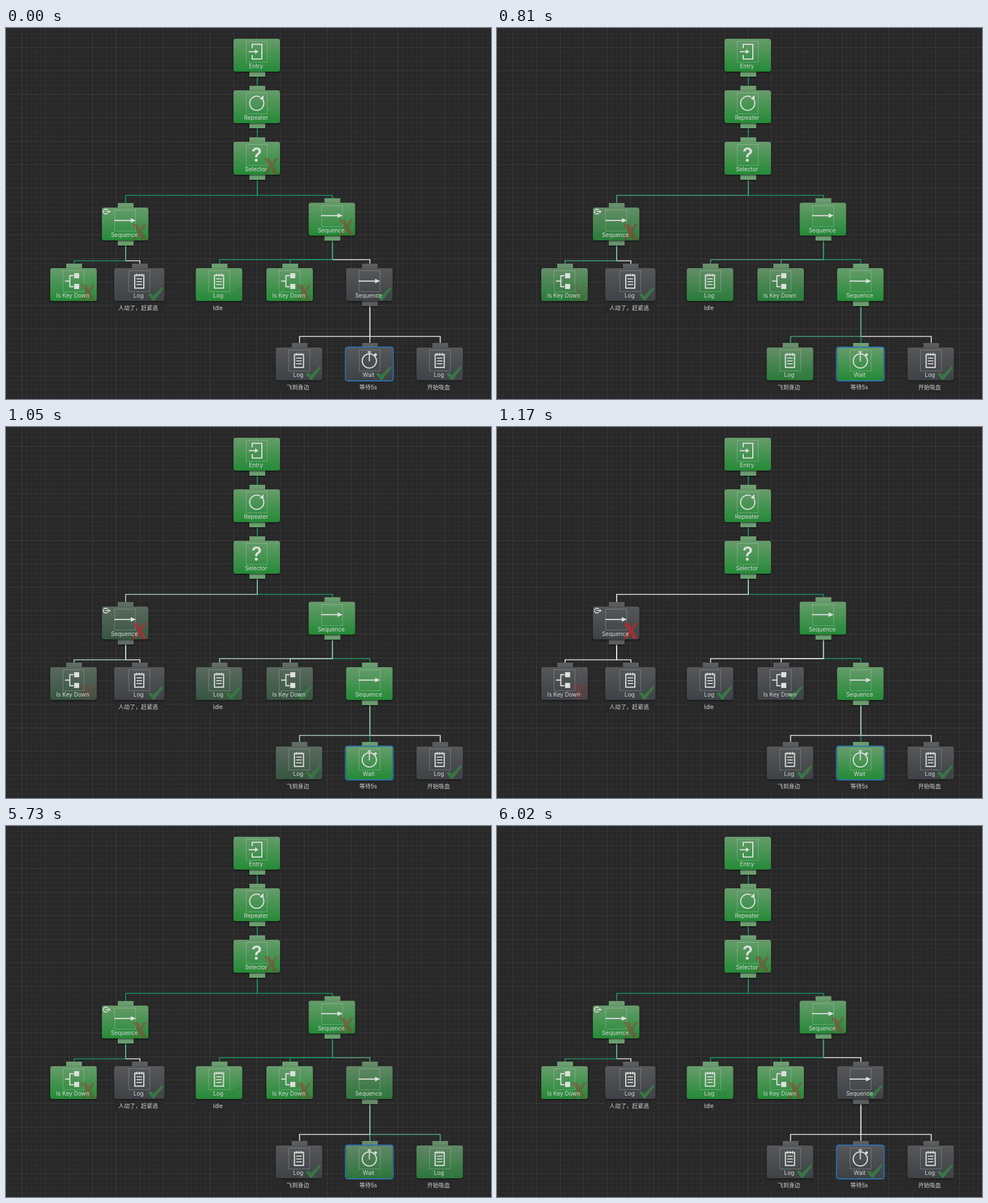
These frames come from a looping animation (855x655 px, 6.59 s). An HTML page with a canvas:

```html
<!DOCTYPE html>
<html lang="en">
<head>
<meta charset="utf-8">
<title>Behavior tree</title>
<style>
html, body { margin: 0; height: 100%; overflow: hidden; background: #282828; }
canvas { display: block; }
</style>
</head>
<body>
<canvas id="stage" width="855" height="655"></canvas>
<script>
const c = document.getElementById('stage').getContext('2d');
const LOOP = 6590, WAITING = 720, RESTART = 5610;
const INK = '#dde0dd';
const FONT = 'Inter, "Noto Sans CJK SC", "Noto Sans CJK", sans-serif';

// run / rerun: 2 = stays active, 1 = active then fades, 0 = idle
const node = (x, y, label, icon, parent, run, rerun, mark = '', remark = '', extra = {}) =>
  ({ x, y, w: 82, label, icon, parent, run, rerun, mark, remark, ...extra });

const entry = node(442, 19, 'Entry', 'door', null, 2, 2);
const repeater = node(442, 110, 'Repeater', 'loop', entry, 2, 2);
const selector = node(442, 201, 'Selector', 'question', repeater, 2, 2, '', 'cross', { bar: 295.5 });
const left = node(210, 317, 'Sequence', 'arrow', selector, 1, 2, 'cross', 'cross', { bar: 411, abort: true });
const right = node(574.5, 308.5, 'Sequence', 'arrow', selector, 2, 2, '', 'cross', { bar: 409 });
const inner = node(640.5, 424, 'Sequence', 'arrow', right, 2, 1, '', 'check', { bar: 544.5 });
const nodes = [
  entry, repeater, selector, left, right,
  node(119, 424, 'Is Key Down', 'tree', left, 1, 2, 'ring', 'cross'),
  node(235, 424, 'Log', 'list', left, 0, 0, 'check', 'check', { w: 89, note: '人动了，赶紧逃' }),
  node(375.5, 424, 'Log', 'list', right, 1, 2, 'check', 'check', { note: 'Idle' }),
  node(500, 424, 'Is Key Down', 'tree', right, 1, 2, 'check', 'cross'),
  inner,
  node(516.5, 564, 'Log', 'list', inner, 1, 0, 'check', 'check', { note: '飞到身边' }),
  node(640.5, 564, 'Wait', 'watch', inner, 2, 1, '', 'check', { note: '等待5s', selected: true }),
  node(764.5, 564, 'Log', 'list', inner, 0, 1, 'check', 'check', { note: '开始吸血' })
];
for (const n of nodes) n.kids = nodes.filter(k => k.parent === n);

const mix = (a, b, k) => `rgb(${a.map((v, i) => Math.round(v + (b[i] - v) * k))})`;
const topColor = k => mix([86, 87, 89], [103, 156, 107], k);
const lowColor = k => mix([62, 66, 70], [36, 138, 55], k);
const tabColor = k => mix([92, 93, 95], [108, 158, 112], k);
const wireColor = k => mix([232, 232, 232], [24, 150, 102], k);

function stroke(points, color = INK, width = 2) {
  c.strokeStyle = color;
  c.lineWidth = width;
  c.beginPath();
  points.forEach(([x, y]) => c.lineTo(x, y));
  c.stroke();
}

function fill(points, color = INK) {
  c.fillStyle = color;
  c.beginPath();
  points.forEach(([x, y]) => c.lineTo(x, y));
  c.fill();
}

function arc(x, y, r, from = 0, to = 2 * Math.PI, color = INK, width = 2) {
  c.strokeStyle = color;
  c.lineWidth = width;
  c.beginPath();
  c.arc(x, y, r, from, to);
  c.stroke();
}

function text(s, x, y, font = '10px', color = '#d6d8d6') {
  c.font = `${font} ${FONT}`;
  c.textAlign = 'center';
  c.fillStyle = color;
  c.fillText(s, x, y);
}

// Icons are drawn around the middle of their frame.
const icons = {
  door() {
    stroke([[-8, -6], [-8, -13], [9, -13], [9, 13], [-8, 13], [-8, 6]]);
    stroke([[-14, 0], [0, 0]]);
    fill([[-3, -4], [3, 0], [-3, 4]]);
  },
  loop() {
    arc(0, 0, 12.5, -0.45, 5.2);
    fill([[5, -8], [12, -14], [12, -5]]);
  },
  question() {
    text('?', 0, 12.5, '600 34px', INK);
  },
  arrow() {
    stroke([[-19, 0], [12, 0]]);
    fill([[10, -4], [19, 0], [10, 4]]);
  },
  tree() {
    stroke([[-15, 0], [-7, 0]]);
    stroke([[0, -9.5], [-6.5, -9.5], [-6.5, 10], [0, 10]]);
    c.fillStyle = INK;
    c.fillRect(1, -14, 9, 9);
    c.fillRect(1, 5, 9, 9);
  },
  list() {
    c.strokeStyle = INK;
    c.lineWidth = 2;
    c.strokeRect(-8, -10.5, 16, 23);
    for (const x of [-4.5, 0, 4.5]) stroke([[x, -13], [x, -8]], INK, 1.5);
    for (const y of [-4, 1, 6]) stroke([[-5, y], [5, y]], INK, 1.7);
  },
  watch() {
    arc(0, 1, 12.5);
    stroke([[0, 2], [0, -15]], INK, 1.8);
    stroke([[-3, -15], [3, -15]]);
    fill([[8, -10], [11, -13], [14, -10], [11, -7]]);
  }
};

// Marks are drawn from the right edge and top of their node.
const marks = {
  check() {
    fill([[-29, 47], [-25, 44], [-20, 49], [-4, 33], [-2, 36], [-18, 57], [-21, 57]], '#367f42');
  },
  cross() {
    fill([[-28, 29], [-19, 29], [-14, 38], [-8, 29], [-3, 29], [-11, 42], [-3, 57],
      [-12, 57], [-16, 47], [-22, 57], [-28, 57], [-19, 43]], '#a92f2f');
  },
  ring() {
    const red = '#a03434';
    arc(-15, 43, 13, 0, 7, red, 2);
    stroke([[-21, 34], [-9, 52]], red, 4);
    stroke([[-9, 34], [-21, 52]], red, 3);
  }
};

function grid() {
  c.fillStyle = '#282828';
  c.fillRect(0, 0, 855, 655);
  const step = 8.28;
  for (let i = -5; i < 105; i++) {
    c.fillStyle = i % 5 ? 'rgba(255,255,255,.032)' : 'rgba(255,255,255,.085)';
    c.fillRect(Math.round(28 + i * step), 0, 1, 655);
    c.fillRect(0, Math.round(34 + i * step), 855, 1);
  }
}

function wires(n) {
  if (!n.kids.length) return;
  const x = n.x + 1, bottom = n.y + 67;
  const bar = n.bar || bottom + 8;
  for (const k of [...n.kids].reverse())
    stroke([[x, bar], [k.x + 1, bar], [k.x + 1, k.y - 7]], wireColor(k.glow), 1.7);
  // The shared stem blends its branches, led by the first one.
  const sum = n.kids.reduce((s, k) => s + k.glow, n.kids[0].glow);
  stroke([[x, bottom], [x, bar + 0.8]], wireColor(sum / (n.kids.length + 1)), 2);
}

function box(n) {
  const { x, y, w, glow } = n, l = x - w / 2;
  if (n.note) {
    c.fillStyle = '#292929';
    c.fillRect(l, y + 60, w, 21);
    text(n.note, x - 2, y + 73.5, '10px', '#d2d2d2');
  }

  c.save();
  c.shadowColor = 'rgba(0,0,0,.7)';
  c.shadowBlur = 3;
  c.shadowOffsetY = 1;
  c.fillStyle = tabColor(glow);
  if (n.parent) c.fillRect(x - 13, y - 8, 28, 9);
  if (n.kids.length) c.fillRect(x - 13, y + 58, 28, 9);
  const paint = c.createLinearGradient(0, y, 0, y + 58);
  paint.addColorStop(0, topColor(glow));
  paint.addColorStop(1, lowColor(glow));
  c.fillStyle = paint;
  c.beginPath();
  c.roundRect(l, y, w, 58, 4);
  c.fill();
  c.restore();

  if (n.selected) {
    c.strokeStyle = '#2f74b5';
    c.lineWidth = 2;
    c.beginPath();
    c.roundRect(l - 1, y - 0.5, w + 2, 59.5, 4);
    c.stroke();
  }

  c.strokeStyle = 'rgba(255,255,255,.24)';
  c.lineWidth = 1;
  c.strokeRect(Math.round(x) - 18.5, Math.round(y) + 4.5, 37, 37);

  if (n.badge) {
    c.save();
    c.translate(x + w / 2, y);
    c.globalAlpha = 0.85 - 0.43 * glow;
    if (n.badge === 'ring') c.globalAlpha *= 0.6;
    marks[n.badge]();
    c.restore();
  }

  c.save();
  c.translate(x, y + 22.8);
  icons[n.icon]();
  c.restore();
  text(n.label, x - 1.3, y + 52.4);

  if (n.abort) {
    arc(l + 7, y + 7.2, 4.3, 0.7, 5.6, INK, 1.6);
    stroke([[l + 6, y + 7.2], [l + 13, y + 7.2]], INK, 1.5);
    fill([[l + 11.5, y + 4.4], [l + 15.5, y + 7.2], [l + 11.5, y + 10]]);
  }
}

function draw(t) {
  const waiting = t >= WAITING && t < RESTART;
  const age = waiting ? t - WAITING : (t - RESTART + LOOP) % LOOP;
  const fade = Math.max(0, 1 - age / (waiting ? 450 : 410));
  for (const n of nodes) {
    n.glow = [0, fade, 1][waiting ? n.run : n.rerun];
    n.badge = waiting ? n.mark : n.remark;
  }
  grid();
  nodes.forEach(wires);
  nodes.forEach(box);
}

const start = performance.now();
function tick() {
  draw((performance.now() - start) % LOOP);
  requestAnimationFrame(tick);
}
tick();
</script>
</body>
</html>
```
